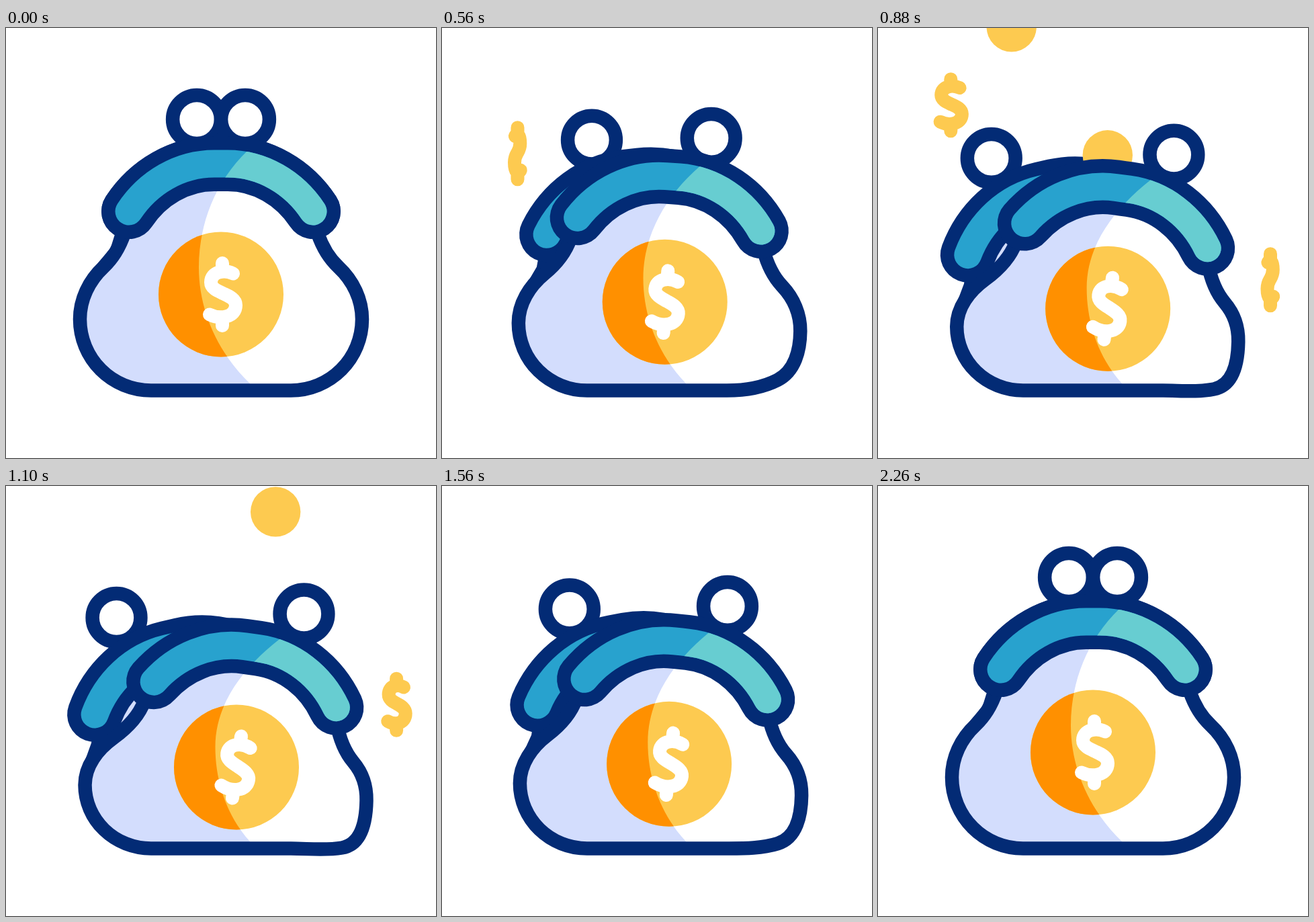
An HTML page with a canvas that plays this animation: 640x640 px, repeating every 2400 ms.

```html
<!DOCTYPE html>
<html lang="en">
<head>
<meta charset="utf-8">
<title>Coin purse</title>
<style>
html, body { margin: 0; width: 100%; height: 100%; overflow: hidden; background: #fff; }
canvas { display: block; width: 100vw; height: 100vh; }
</style>
</head>
<body>
<canvas id="stage" width="640" height="640"></canvas>
<script>
const ctx = document.getElementById('stage').getContext('2d');
const LOOP = 2400, OPEN_END = 1116, CLOSE_END = 2266;
const NAVY = '#032b75', LAVENDER = '#d3ddfd', BLUE = '#28a2ce', TEAL = '#67cdd1',
      YELLOW = '#fdca50', ORANGE = '#ff9000', LINE = 20.5;

const rad = deg => deg * Math.PI / 180;
const mix = (a, b, p) => a + (b - a) * p;
const mixNodes = (a, b, p) => a.map((node, i) => node.map((v, j) => mix(v, b[i][j], p)));
const clamp = v => Math.min(1, Math.max(0, v));

// Joins nodes [x, y, heading in degrees] with near-circular arcs
function arcs(nodes) {
  const path = new Path2D();
  nodes.forEach(([x, y, h], i) => {
    if (!i) return path.moveTo(x, y);
    const [px, py, ph] = nodes[i - 1];
    const arm = Math.hypot(x - px, y - py) * 2 / 3 / (1 + Math.cos(rad(h - ph) / 2));
    path.bezierCurveTo(
      px + arm * Math.cos(rad(ph)), py + arm * Math.sin(rad(ph)),
      x - arm * Math.cos(rad(h)), y - arm * Math.sin(rad(h)), x, y);
  });
  return path;
}

const mirror = nodes => nodes.map(([x, y, h]) => [640 - x, y, 360 - h]).reverse();

// The closed purse is symmetric, the open one leans right
const RIGHT = [[464, 306, 71], [495, 356, 43], [530, 433.5, 90], [499, 508.5, 135], [424, 539.5, 180]];
const CLOSED = [...RIGHT, ...mirror(RIGHT)];
const OPENED = [
  [492, 352, 80], [517, 411, 50], [536.5, 468, 91], [500, 538.5, 170], [424, 539.5, 180],
  [216, 539.5, 180], [146, 511.5, 224], [117.5, 445, 270], [160, 375, 324], [206, 320, 290]
];
const SHADE_CLOSED = [[359, 183, 136], [287, 356, 90], [363, 529, 44]];
const SHADE_OPENED = [[407, 228, 142], [311.5, 388, 90], [363, 529, 48]];

const SPINE = arcs([[-137, 0, -56.6], [-10, -71, 0], [10, -71, 0], [137, 0, 56.6]]);
const SIGN = arcs([[16, -31, 205], [-17, -18, 90], [2, -1, 25], [20, 16, 90], [-19, 30, 205]]);
SIGN.addPath(new Path2D('M0 -46.5V-36M0 37V46.5'));

function ease(x, x1, x2) {
  let lo = 0, hi = 1, s = 0.5;
  for (let i = 0; i < 30; i++) {
    s = (lo + hi) / 2;
    const u = 1 - s;
    if (3 * x1 * s * u * u + 3 * x2 * s * s * u + s * s * s < x) lo = s; else hi = s;
  }
  return s * s * (3 - 2 * s);
}

function openness(t) {
  if (t < OPEN_END) return ease(t / OPEN_END, 0.75, 0.25);
  return 1 - ease(clamp((t - OPEN_END) / (CLOSE_END - OPEN_END)), 0.75, 0.165);
}

// Everything between the shading edge and the stage border at x
function side(nodes, x) {
  const path = arcs(nodes), [tx, ty] = nodes[0];
  path.lineTo(nodes[2][0], 640);
  path.lineTo(x, 640);
  path.lineTo(x, ty - 19);
  path.lineTo(tx + 20, ty - 19);
  return path;
}

function stroke(path, color, width) {
  ctx.strokeStyle = color;
  ctx.lineWidth = width;
  ctx.stroke(path);
}

function fill(path, color) {
  ctx.fillStyle = color;
  ctx.fill(path);
}

function clipped(region, paint) {
  ctx.save();
  ctx.clip(region);
  paint();
  ctx.restore();
}

function disc(x, y, r) {
  const path = new Path2D();
  path.arc(x, y, r, 0, Math.PI * 2);
  return path;
}

// Moves the geometry only, so line weights stay constant
function placed(path, x, y, deg, sx = 1, sy = 1) {
  const out = new Path2D();
  out.addPath(path, new DOMMatrix().translate(x, y).rotate(deg).scale(sx, sy));
  return out;
}

function ring(x, y) {
  const path = disc(x, y, 35.9);
  fill(path, '#fff');
  stroke(path, NAVY, LINE);
}

function clasp(x, y, deg) {
  const path = placed(SPINE, x, y, deg);
  stroke(path, NAVY, 4 * LINE);
  stroke(path, BLUE, 2 * LINE);
  return path;
}

function flyingSign(t, x, y) {
  const age = t - 560;
  const size = clamp((t - 290) / 100) * clamp((1050 - t) / 100);
  if (size <= 0) return;
  const k = 0.83 * size, spin = Math.cos(rad(106 - 0.32 * age));
  stroke(placed(SIGN, x - 0.013 * age, y - 0.225 * age, 0, k * spin, k), YELLOW, 20 * size);
}

function flyingCoin(age, x, y, vx, vy) {
  const cy = y - vy * age;
  if (cy < 300 && cy > -40) fill(disc(x + vx * age, cy, 37.2), YELLOW);
}

function backHalf(p) {
  const path = new Path2D();
  path.moveTo(mix(178, 150, p), 290);
  path.lineTo(mix(165, 137, p), mix(332, 385, p));
  path.lineTo(mix(145, 128, p), mix(356, 410, p));
  path.lineTo(300, 450);
  path.lineTo(300, 265);
  path.closePath();
  fill(path, LAVENDER);
  stroke(path, NAVY, LINE);
  ring(mix(284, 164.5, p), mix(136, 196, p));
  clasp(mix(320, 265.4, p), mix(273, 308.5, p), -13.3 * p);
}

function frontHalf(p) {
  const edge = mixNodes(SHADE_CLOSED, SHADE_OPENED, p);
  const dark = side(edge, 0), light = side(edge, 640);

  const outline = arcs(mixNodes(CLOSED, OPENED, p));
  const body = new Path2D(outline);
  body.lineTo(mix(320, 369.8, p), mix(173, 211.5, p));
  fill(body, '#fff');
  clipped(body, () => fill(dark, LAVENDER));
  stroke(outline, NAVY, LINE);

  const coin = disc(mix(320, 343, p), mix(396.5, 418.5, p), 93);
  fill(coin, YELLOW);
  clipped(coin, () => fill(dark, ORANGE));
  stroke(placed(SIGN, mix(322, 343.5, p), mix(396.5, 418.5, p), 8.1 * p), '#fff', 20);

  ring(mix(356, 443.5, p), mix(136, 190.5, p));
  const lid = clasp(mix(320, 355.75, p), mix(273, 310.5, p), 8.1 * p);
  clipped(light, () => stroke(lid, TEAL, 2 * LINE));
}

function draw(t) {
  const p = openness(t);
  ctx.fillStyle = '#fff';
  ctx.fillRect(0, 0, 640, 640);
  ctx.lineCap = ctx.lineJoin = 'round';
  flyingSign(t, 112.5, 187);
  flyingSign(t - 320, 584, 375);
  backHalf(p);
  flyingCoin(t - 880, 199, -1, -0.27, 0.72);
  flyingCoin(t - 880, 341.5, 190, 0.27, 0.686);
  frontHalf(p);
}

const start = performance.now();
function tick() {
  draw((performance.now() - start) % LOOP);
  requestAnimationFrame(tick);
}
tick();
</script>
</body>
</html>
```
